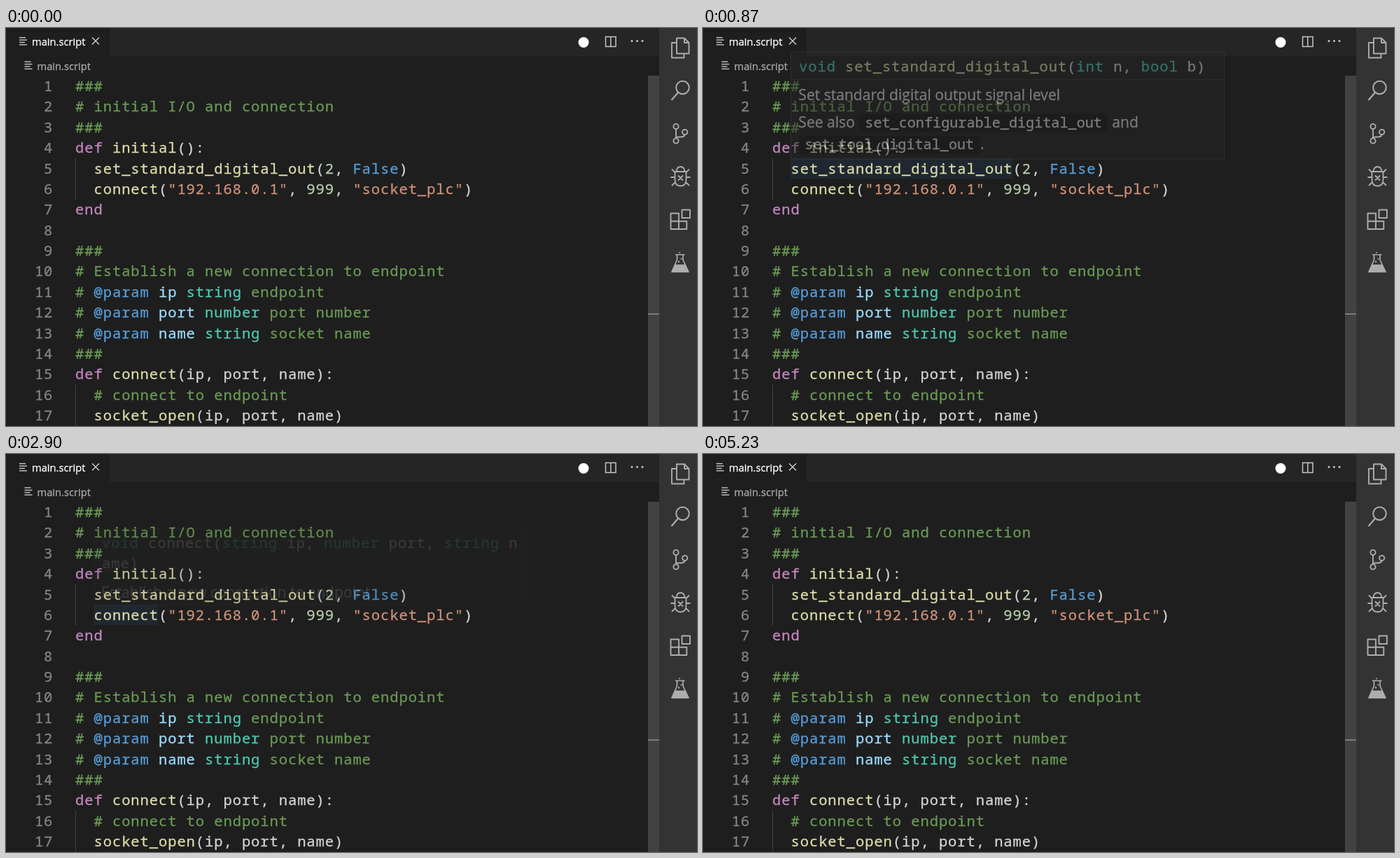
An HTML page with a canvas that plays this animation: 987 px wide and 568 px high, repeating every 5.26 s.

```html
<!DOCTYPE html>
<html lang="en">
<head>
<meta charset="utf-8">
<title>Editor hover</title>
<style>
html, body { margin: 0; width: 100%; height: 100%; overflow: hidden; background: #1e1e1e; }
canvas { display: block; }
</style>
</head>
<body>
<canvas id="stage" width="987" height="568"></canvas>
<script>
const W = 987, H = 568, LOOP = 5260;
const LEFT = 99.1, PITCH = 29.38, BASE = 90, ADVANCE = 13.21;
const MONO = '"Noto Sans Mono", monospace';
const SANS = '"Open Sans", "Noto Sans", sans-serif';

const COLORS = {
  c: '#6a9955', k: '#c586c0', f: '#dcdcaa', t: '#d4d4d4', s: '#ce9178',
  n: '#b5cea8', b: '#569cd6', v: '#9cdcfe', y: '#4ec9b0'
};

// Tokens are split by "~"; the first letter of each picks its colour.
const CODE = [
  'c###',
  'c# initial I/O and connection',
  'c###',
  'kdef ~finitial~t():',
  't  ~fset_standard_digital_out~t(~n2~t, ~bFalse~t)',
  't  ~fconnect~t(~s"192.168.0.1"~t, ~n999~t, ~s"socket_plc"~t)',
  'kend',
  '',
  'c###',
  'c# Establish a new connection to endpoint',
  'c# ~b@param ~vip ~ystring ~cendpoint',
  'c# ~b@param ~vport ~ynumber ~cport number',
  'c# ~b@param ~vname ~ystring ~csocket name',
  'c###',
  'kdef ~fconnect~t(ip, port, name):',
  'c  # connect to endpoint',
  't  ~fsocket_open~t(ip, port, name)'
];

function makeLayer(paint) {
  const canvas = document.createElement('canvas');
  canvas.width = W;
  canvas.height = H;
  paint(canvas.getContext('2d'));
  return canvas;
}

function rect(g, x, y, w, h, color) {
  g.fillStyle = color;
  g.fillRect(x, y, w, h);
}

// A hairline outline gives the text a slightly firmer weight.
function inkText(g, text, x, y, color) {
  g.fillStyle = g.strokeStyle = color;
  g.lineWidth = 0.3;
  g.strokeText(text, x, y);
  g.fillText(text, x, y);
}

function label(g, text, x, y, size, color, family = SANS) {
  g.font = size + 'px ' + family;
  g.letterSpacing = '0px';
  inkText(g, text, x, y, color);
}

function codeLine(g, line, x, y) {
  g.font = '20.5px ' + MONO;
  g.letterSpacing = '0.91px';
  let col = 0;
  for (const token of line.split('~')) {
    const text = token.slice(1);
    inkText(g, text, x + col * ADVANCE, y, COLORS[token[0]] || COLORS.t);
    col += text.length;
  }
}

function stroke(g, d, color, width) {
  g.strokeStyle = color;
  g.lineWidth = width;
  g.stroke(new Path2D(d));
}

function dot(g, x, y, r, color) {
  g.fillStyle = color;
  g.beginPath();
  g.arc(x, y, r, 0, Math.PI * 2);
  g.fill();
}

function ring(g, x, y, r, color, width) {
  g.strokeStyle = color;
  g.lineWidth = width;
  g.beginPath();
  g.arc(x, y, r, 0, Math.PI * 2);
  g.stroke();
}

function fileIcon(g, x, y) {
  [9, 11, 8, 11].forEach((w, i) => rect(g, x, y + i * 3.4, w, 1.4, '#c5c5c5'));
}

function paintFrame(g) {
  rect(g, 0, 0, W, H, '#1e1e1e');
  rect(g, 148, 0, 785, 40, '#252526');
  rect(g, 917, 68, 16, 500, '#424242');
  rect(g, 917, 407.5, 16, 1.5, '#8c8c8c');
  rect(g, 933, 0, 54, H, '#333333');
  rect(g, 99, 186, 1, 59, '#404040');
  rect(g, 99, 509, 1, 59, '#404040');
}

function paintText(g) {
  fileIcon(g, 19, 13);
  label(g, 'main.script', 37, 25, 14.7, '#ffffff');
  stroke(g, 'M123 13.5l10 10m0-10l-10 10', '#d0d0d0', 1.4);
  fileIcon(g, 26.5, 47.5);
  label(g, 'main.script', 44.5, 59.5, 14.7, '#a9a9a9');

  CODE.forEach((line, i) => {
    const y = BASE + i * PITCH, n = String(i + 1);
    codeLine(g, line, LEFT, y);
    inkText(g, n, 67.3 - n.length * ADVANCE, y, '#858585');
  });
}

function paintIcons(g) {
  dot(g, 825, 20.5, 7.5, '#ffffff');
  stroke(g, 'M856.5 12.5h14.5v14h-14.5zM863.8 12.5v14', '#c5c5c5', 1.5);
  [894, 901.5, 909].forEach(x => dot(g, x, 18.5, 1.5, '#c5c5c5'));

  const ink = '#adadad';
  g.lineJoin = 'round';
  // files
  stroke(g, 'M958 14.5h11l6.5 6.5v15.5h-17.5zM969 14.5v6.5h6.5M958 21h-7v21.5h17.5v-6', ink, 1.9);
  // search
  ring(g, 966.5, 85, 9.3, ink, 2);
  stroke(g, 'M960 92L950.5 103', ink, 2.2);
  // branches
  ring(g, 957, 140.5, 3.6, ink, 1.9);
  ring(g, 957, 161, 3.6, ink, 1.9);
  ring(g, 969.7, 148.5, 3.6, ink, 1.9);
  stroke(g, 'M957 144V157.5M969.5 152Q969 155.5 964 155.5H961Q957 155.5 957 157.5', ink, 1.9);
  // bug
  stroke(g, 'M955.5 205H971.5V216Q971.5 225.5 963.5 225.5Q955.5 225.5 955.5 216Z' +
    'M957.5 205Q958 198 963.5 198Q969 198 969.5 205' +
    'M955.5 206L951 201.5M971.5 206L976 201.5M949.5 213H955.5M971.5 213H977.5' +
    'M956.5 219.5L951 225M970.5 219.5L976 225M960 210.5l7 7m0-7l-7 7', ink, 1.8);
  // extensions
  stroke(g, 'M949.5 264.5h11.5v22.5h-11.5zM949.5 275.7h22.8v11.3h-11.3M972.3 275.7v11.3' +
    'M965.5 259.5h11.5v11.5h-11.5z', ink, 1.9);
  // flask
  stroke(g, 'M956 323.5H969.5M958.5 324V331L951 348H975L967 331V324', ink, 1.7);
  g.fillStyle = ink;
  g.fill(new Path2D('M955.5 337.5H970L975 348.5H950.5Z'));
  dot(g, 961, 333.5, 1.2, ink);
  dot(g, 964.5, 329.5, 1.1, ink);
  dot(g, 962, 320.5, 1, ink);
}

function popup(g, y, h, rule) {
  rect(g, 125, y, 620, h, '#454545');
  rect(g, 126, y + 1, 618, h - 2, '#252526');
  rect(g, 126, rule, 618, 1, '#3c3c3c');
}

function codeChip(g, text, x, y, w) {
  g.fillStyle = '#1a1a1b';
  g.beginPath();
  g.roundRect(x, y - 19, w, 26, 4);
  g.fill();
  label(g, text, x + 8.3, y, 20.17, '#e4e4e4', MONO);
}

function paintOutputPopup(g) {
  const ink = '#dcdcdc';
  popup(g, 33.5, 154, 73);
  codeLine(g, 'yvoid ~fset_standard_digital_out~t(~yint~t n, ~ybool~t b)', 137, 62);
  label(g, 'Set standard digital output signal level', 136.3, 102.7, 21.1, ink);
  label(g, 'See also', 136.3, 141.5, 21.1, ink);
  codeChip(g, 'set_configurable_digital_out', 223, 141.5, 355);
  label(g, 'and', 584.3, 141.5, 21.1, ink);
  codeChip(g, 'set_tool_digital_out', 137, 173, 259);
  label(g, '.', 396, 173, 21.1, ink);
}

function paintConnectPopup(g) {
  popup(g, 106, 110, 176);
  codeLine(g, 'yvoid ~fconnect~t(~ystring~t ip, ~ynumber~t port, ~ystring~t n', 137, 134);
  codeLine(g, 'tame)', 137, 163.4);
  label(g, 'Establish a new connection to endpoint', 136, 204.5, 21, '#dcdcdc');
}

const frameLayer = makeLayer(paintFrame);
const textLayer = makeLayer(g => { paintText(g); paintIcons(g); });

const HOVERS = [
  { from: 800, full: 970, to: 2370, steps: 5, row: 4, chars: 24, layer: makeLayer(paintOutputPopup) },
  { from: 2900, full: 3100, to: 4930, steps: 6, row: 5, chars: 7, layer: makeLayer(paintConnectPopup) }
];

const ctx = document.getElementById('stage').getContext('2d');

// The fade advances in even steps, starting faintly visible.
function fade(h, t) {
  const p = Math.min(1, (t - h.from) / (h.full - h.from));
  return 0.14 + 0.86 * Math.floor(p * h.steps + 1e-6) / h.steps;
}

function draw(t) {
  const hover = HOVERS.find(h => t >= h.from && t < h.to);
  ctx.globalAlpha = 1;
  ctx.drawImage(frameLayer, 0, 0);
  if (hover) {
    const y = Math.round(68.5 + hover.row * PITCH);
    rect(ctx, 125, y, hover.chars * ADVANCE, 29, '#1f2831');
  }
  ctx.drawImage(textLayer, 0, 0);
  if (hover) {
    ctx.globalAlpha = fade(hover, t);
    ctx.drawImage(hover.layer, 0, 0);
  }
}

const start = performance.now();
function tick() {
  draw((performance.now() - start) % LOOP);
  requestAnimationFrame(tick);
}
tick();
</script>
</body>
</html>
```
